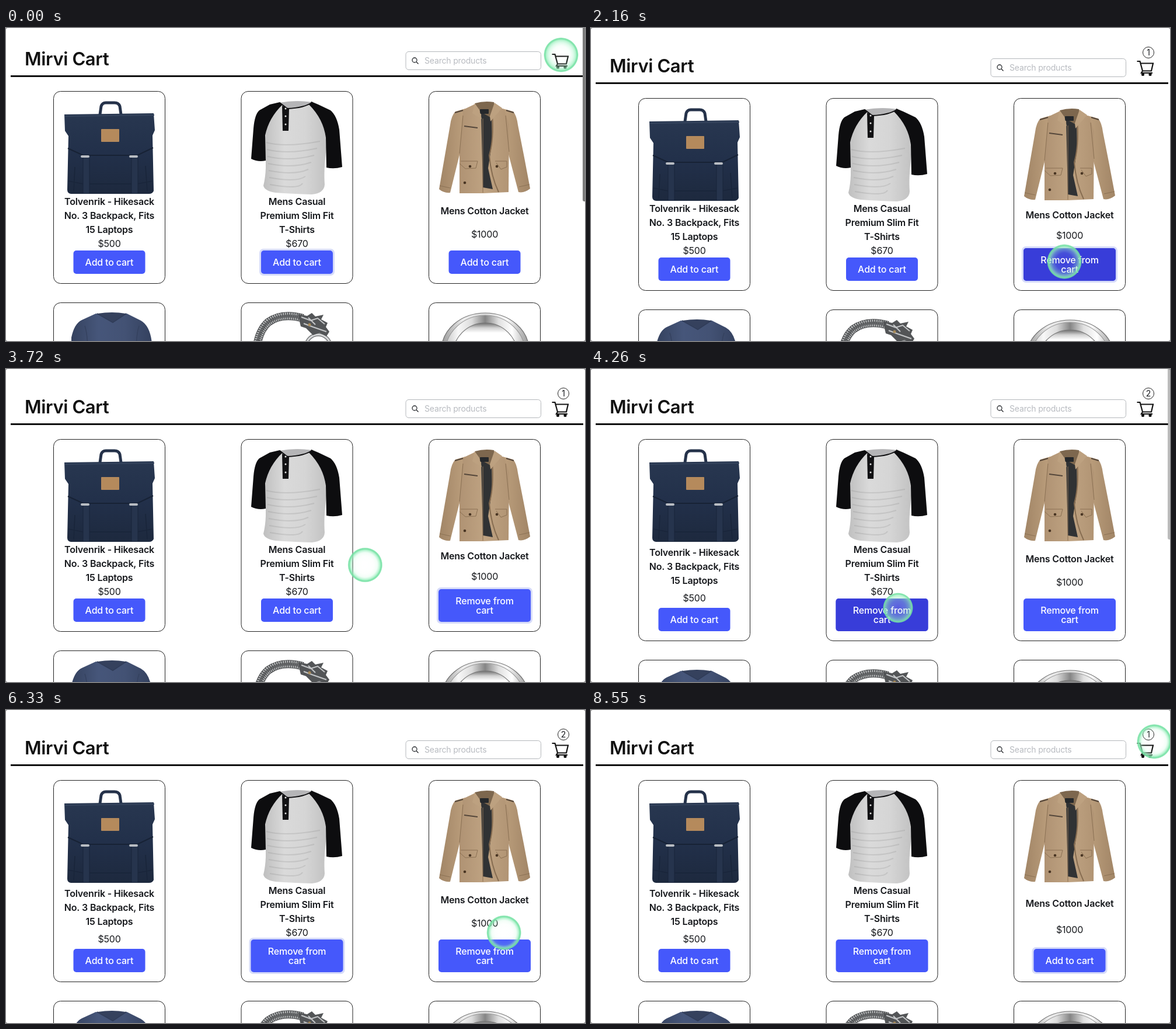
These frames come from a looping animation (992 px wide and 536 px high, 8.58 s). An HTML page with a canvas:

```html
<!DOCTYPE html>
<html lang="en">
<head>
<meta charset="utf-8">
<title>Shop</title>
<style>
html, body { margin: 0; width: 100%; height: 100%; overflow: hidden; background: #fff; }
canvas { display: block; width: 992px; height: 536px; }
</style>
</head>
<body>
<canvas id="stage" width="992" height="536"></canvas>
<script>
const ctx = document.getElementById('stage').getContext('2d');
const LOOP = 8580;
const CLICKS = [1740, 4200, 6780];
const INK = '#16181c';

// Pointer moves: start, duration, destination
const MOVES = [
  [30, 180, 953, 53], [720, 740, 811, 400], [2370, 510, 954, 57],
  [3270, 720, 526, 409], [4624, 650, 952, 48], [5820, 706, 844, 412],
  [7320, 760, 968, 56], [8220, 330, 965, 54]
];

// One entry per phase: title y, price y, button y, whether it is in the cart
const PRODUCTS = [
  { x: 81, lines: ['Tolvenrik - Hikesack', 'No. 3 Backpack, Fits', '15 Laptops'], price: '$500', draw: drawBackpack,
    phases: [[297, 369, 381, 0], [309, 381, 393, 0], [314.5, 392, 409, 0], [314.5, 392, 409, 0]] },
  { x: 402.5, lines: ['Mens Casual', 'Premium Slim Fit', 'T-Shirts'], price: '$670', draw: drawShirt,
    phases: [[297, 369, 381, 0], [309, 381, 393, 0], [309, 381, 393, 1], [309, 381, 393, 1]] },
  { x: 724, lines: ['Mens Cotton Jacket'], price: '$1000', draw: drawJacket,
    phases: [[313, 353, 381, 0], [320, 355, 377, 1], [325, 365, 393, 1], [331, 376, 409, 0]] }
];

const clamp = v => Math.max(0, Math.min(1, v));
const ease = p => p < .5 ? 4 * p ** 3 : 1 - 4 * (1 - p) ** 3;
const between = (t, from, to, fade) => Math.min(clamp((t - from) / fade), clamp((to + fade - t) / fade));

function fill(d, color) {
  ctx.fillStyle = color;
  ctx.fill(new Path2D(d));
}
function line(d, color, width = 1) {
  ctx.strokeStyle = color;
  ctx.lineWidth = width;
  ctx.stroke(new Path2D(d));
}
function rounded(x, y, w, h, r) {
  ctx.beginPath();
  ctx.roundRect(x, y, w, h, r);
}
function box(x, y, w, h, r, color) {
  rounded(x, y, w, h, r);
  ctx.fillStyle = color;
  ctx.fill();
}
function outline(x, y, w, h, r, color) {
  rounded(x + .5, y + .5, w - 1, h - 1, r);
  ctx.strokeStyle = color;
  ctx.lineWidth = 1;
  ctx.stroke();
}
function dot(x, y, r, color) {
  ctx.beginPath();
  ctx.arc(x, y, r, 0, 7);
  ctx.fillStyle = color;
  ctx.fill();
}
function gradient(x0, y0, x1, y1, ...colors) {
  const g = ctx.createLinearGradient(x0, y0, x1, y1);
  colors.forEach((c, i) => g.addColorStop(i / (colors.length - 1), c));
  return g;
}
function text(s, x, y, { size = 16, weight = 400, color = INK, align = 'center' } = {}) {
  ctx.font = `${weight} ${size}px Inter, sans-serif`;
  ctx.letterSpacing = `${-.012 * size}px`;
  ctx.textAlign = align;
  ctx.fillStyle = color;
  ctx.fillText(s, x, y + size * .36);
}

function drawBackpack() {
  line('M161 148L163 134Q165 128 171 128H186Q193 128 195 134L197 148', '#25324a', 5);
  fill('M100 148L253 146L255 175L251 184L253 279Q251 284 245 284H111Q105 283 105 277L107 185L101 176Z',
    gradient(0, 146, 0, 284, '#283750', '#22304a', '#1d293e'));
  line('M101 151L254 149', '#35445d', 2);
  line('M106 206L132 218H225L252 205', '#172235', 2);
  line('M118 238L116 280M239 236L242 280M107 262L132 267H225L251 262', '#19253a', 1.5);
  for (const x of [132, 215]) {
    box(x, 220, 11, 63, 1, '#26344d');
    line(`M${x} 222V283M${x + 11} 222V283`, '#18243a');
    box(x - 4, 218, 15, 4, 2, '#b9bdc3');
  }
  box(163, 173, 31, 22, 1, '#b58a5c');
}

function drawShirt() {
  fill('M468 128Q497 122 526 128L545 150L549 205Q544 244 546 268Q545 283 524 285Q490 284 462 282Q443 279 441 270Q448 242 443 205L446 155Z',
    gradient(441, 0, 549, 0, '#bfbfbf', '#dadada', '#d5d5d5', '#c2c2c2'));
  fill('M469 127L452 131L434 141Q426 148 424 172L420 224Q432 230 445 227L444 184Q450 154 474 131Z', '#0d0d0f');
  fill('M523 126L535 131L556 141Q567 150 571 174L576 238Q562 242 549 239L548 188Q544 156 519 131Z', '#0d0d0f');
  fill('M469 128Q497 123 525 127Q512 137 484 138Z', '#b5b5b7');
  line('M469 128L482 138Q511 137 525 127', '#0d0d0f', 2);
  fill('M473 133L485 138L484 176H474Z', '#111113');
  for (const y of [138, 151, 165]) dot(479, y, 1.5, '#e4e4e4');
  for (let i = 0; i < 7; i++) {
    const y = 196 + i * 12;
    line(`M${446 + i} ${y}Q${478 + i * 4} ${y + 9} ${538 - i * 5} ${y - 2}`, 'rgba(110,110,110,.18)', 2);
  }
}

function drawJacket() {
  fill('M787 138L770 143Q763 150 761 166L752 218L742 276Q750 283 761 282L780 205Z', gradient(742, 0, 785, 0, '#a18566', '#bb9e7c'));
  fill('M851 138L869 143Q875 150 877 166L888 222L898 275Q888 283 878 281L858 205Z', gradient(853, 0, 898, 0, '#bb9e7c', '#a18566'));
  fill('M804 130L783 140L777 212L777 283H818L861 281L862 165L854 140L836 130Z', gradient(776, 0, 863, 0, '#af9273', '#bfa382', '#b19474'));
  fill('M814 144L832 146L833 195L826 240L834 276L817 273Z', '#303234');
  line('M833 148Q836 190 828 218Q831 254 844 281', '#866c50', 2);
  fill('M803 129Q820 124 836 127L839 139L830 153L812 143Z', '#7d674e');
  box(812, 139, 15, 8, 1, '#25282b');
  fill('M803 129L811 140L815 156L799 146ZM837 128L850 137L830 160L829 151Z', '#bda180');
  line('M785 168L808 171M769 145L783 141M870 145L857 141', '#54463a', 2);
  line('M777 232L787 241L805 240L808 228L779 228M840 231L848 242L858 238V228H838M817 155V282M743 270L761 274M879 272L897 268M783 150L777 215M856 150L862 212', '#8b7154');
  for (const [x, y] of [[795, 237], [786, 265], [841, 237]]) dot(x, y, 2.3, '#493523');
}

function drawTee() {
  fill('M154 489L130 500Q117 506 112 530V570H250V540Q247 510 231 501L207 489Q184 496 154 489Z',
    gradient(112, 0, 250, 0, '#35425f', '#46567a', '#435274', '#34415f'));
  fill('M157 489Q182 485 205 489L183 503Z', '#35415d');
  line('M156 489L183 504L206 489', '#303c58', 2);
  line('M135 510Q141 528 139 560M228 510Q222 528 224 560', '#35425f', 1.5);
}

function drawBracelet() {
  const chain = 'M428 562Q430 521 449 504Q472 487 509 497';
  line(chain, '#4a4c4e', 14);
  ctx.setLineDash([2, 1.5]);
  line(chain, '#b9bbbc', 12);
  ctx.setLineDash([1.5, 2]);
  line(chain, '#4f5153', 5);
  ctx.setLineDash([]);
  ctx.beginPath();
  ctx.arc(535, 546, 21, 0, 7);
  ctx.strokeStyle = '#77797b';
  ctx.lineWidth = 6;
  ctx.stroke();
  ctx.strokeStyle = '#d7d8d9';
  ctx.lineWidth = 3;
  ctx.stroke();
  fill('M500 490L516 493L524 488L530 494L544 491L540 499L551 505L548 512L554 520L549 528L537 522L526 526L514 514L505 511Z', '#535557');
  line('M506 495L522 501L534 497L546 507M510 506L526 512L549 520M518 496L530 508', '#c4c6c8', 2);
  dot(520, 508, 2.5, '#a88a57');
}

function drawRing() {
  const oval = (cy, rx, ry, color, edge) => {
    ctx.beginPath();
    ctx.ellipse(821, cy, rx, ry, 0, 0, 7);
    ctx.fillStyle = color;
    ctx.fill();
    ctx.strokeStyle = edge;
    ctx.lineWidth = 1.2;
    ctx.stroke();
  };
  oval(552, 75, 64, gradient(746, 0, 896, 0, '#999', '#eee', '#d9d9d9', '#fafafa', '#999'), '#707070');
  oval(558, 69, 66, gradient(752, 0, 890, 0, '#c4c4c4', '#f8f8f8', '#dcdcdc', '#858585', '#e0e0e0', '#fff', '#b5b5b5'), '#9a9a9a');
  oval(562, 56, 57, gradient(0, 505, 0, 522, '#6c6c6c', '#d2d2d2', '#fff'), '#777');
}

function drawHeader(dy, count) {
  text('Mirvi Cart', 32, 53 + dy, { size: 31, weight: 600, color: '#111', align: 'left' });
  outline(684.5, 40 + dy, 232.5, 32, 5, '#b4b7bb');
  text('Search products', 717, 56 + dy, { size: 14, color: '#b8bbc0', align: 'left' });
  ctx.fillStyle = '#111';
  ctx.fillRect(8, 81 + dy, 981, 3);
  ctx.save();
  ctx.translate(0, dy);
  ctx.beginPath();
  ctx.arc(700, 55, 4, 0, 7);
  ctx.strokeStyle = '#2c2f33';
  ctx.lineWidth = 1.3;
  ctx.stroke();
  line('M703 58L706.5 61.5', '#2c2f33', 1.4);
  line('M935.5 45H940.5L945 61.5H960L963 48.5H942M945 61.5L943 65H962', '#141414', 2.2);
  dot(945.5, 67.5, 2.6, '#141414');
  dot(958, 67.5, 2.6, '#141414');
  ctx.restore();
  if (count) {
    outline(945, 32, 20, 20, 10, '#222');
    text(String(count), 955, 42, { size: 14 });
  }
}

function drawButton(cx, y, inCart, hover, focus) {
  const w = inCart ? 158 : 123, h = inCart ? 56 : 40, x = cx - w / 2;
  if (focus) box(x - 3, y - 3, w + 6, h + 6, 7, `rgba(214,219,249,${focus})`);
  box(x, y, w, h, 5, '#4558fb');
  if (hover) box(x, y, w, h, 5, `rgba(56,61,217,${hover})`);
  const style = { weight: 500, color: '#fff' };
  if (inCart) {
    text('Remove from', cx, y + 20, style);
    text('cart', cx, y + 36, style);
  } else text('Add to cart', cx, y + 20, style);
}

function drawCards(t, phase, dy) {
  const hovers = [0, between(t, 3760, 4770, 130),
    Math.max(between(t, 1290, 2480, 130), between(t, 6390, 7460, 130))];
  const focuses = [0, Math.max(t < 1640 ? 1 : 0, between(t, 4330, 6690, 120)),
    Math.max(between(t, 1850, 4110, 120), between(t, 6900, LOOP, 120))];
  PRODUCTS.forEach((p, i) => {
    const [titleY, priceY, buttonY, inCart] = p.phases[phase];
    const cx = p.x + 96;
    outline(p.x, 108 + dy, 192, phase > 1 ? 346 : 330, 12, '#222');
    ctx.save();
    ctx.translate(0, dy);
    p.draw();
    ctx.restore();
    p.lines.forEach((s, n) => text(s, cx, titleY + n * 24, { weight: 600 }));
    text(p.price, cx, priceY);
    drawButton(cx, buttonY, inCart, hovers[i], focuses[i]);
  });
  ctx.save();
  ctx.translate(0, dy + (phase > 1 ? 16 : 0));
  for (const p of PRODUCTS) outline(p.x, 470, 192, 330, 12, '#222');
  drawTee();
  drawBracelet();
  drawRing();
  ctx.restore();
}

function drawPointer(t) {
  let x = 951, y = 46, moving = 0;
  for (const [start, duration, toX, toY] of MOVES) {
    const p = ease(clamp((t - start) / duration));
    x += (toX - x) * p;
    y += (toY - y) * p;
    moving = Math.max(moving, between(t, start, start + duration, 120));
  }
  const press = Math.max(...CLICKS.map(c => between(t, c - 90, c + 90, 80)));
  const r = 30 - 4 * press;
  // The inner glow widens while the pointer rests
  const glow = 1 - .6 * moving;
  const g = ctx.createRadialGradient(x, y, 0, x, y, r);
  g.addColorStop(0, `rgba(255,255,255,${.16 * press})`);
  g.addColorStop(.5, `rgba(190,248,214,${.1 * glow + .2 * press})`);
  g.addColorStop(.7, `rgba(160,243,196,${.36 * glow + .12 * press})`);
  g.addColorStop(.84, 'rgba(150,238,187,.7)');
  g.addColorStop(.89, 'rgba(122,228,167,.9)');
  g.addColorStop(.95, 'rgba(115,224,162,.9)');
  g.addColorStop(1, 'rgba(130,232,174,0)');
  dot(x, y, r, g);
}

function drawScrollbar(t, phase) {
  const alpha = phase ? between(t, CLICKS[1], 5880, 120) : between(t, -120, 1500, 120);
  if (alpha) box(988, -4, 6, phase ? 296 : 301, 3, `rgba(125,125,125,${alpha})`);
}

function render(t) {
  const phase = CLICKS.filter(c => t >= c).length;
  const dy = phase ? 12 : 0;
  ctx.fillStyle = '#8a8a8a';
  ctx.fillRect(0, 0, 992, 536);
  box(0, 0, 992, 536, 3, '#fff');
  drawHeader(dy, [0, 1, 2, 1][phase]);
  drawCards(t, phase, dy);
  drawScrollbar(t, phase);
  drawPointer(t);
}

const began = performance.now();
function tick() {
  render((performance.now() - began) % LOOP);
  requestAnimationFrame(tick);
}
tick();
</script>
</body>
</html>
```
